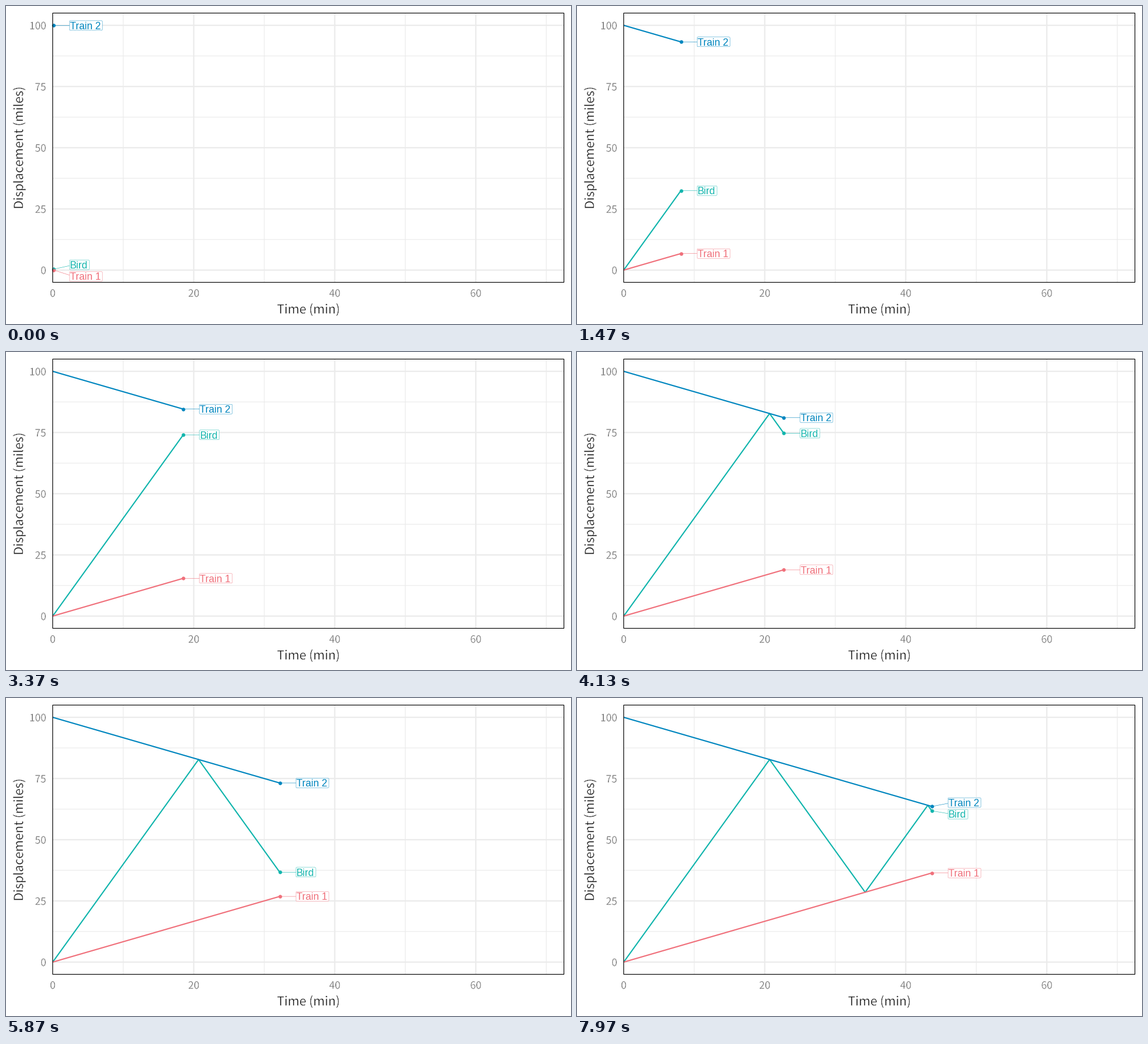
Animation of 998x561 px, one loop 8000 ms. Source, as a matplotlib script:

```python
import matplotlib.pyplot as plt
from matplotlib.animation import FuncAnimation
from matplotlib.patches import FancyBboxPatch, Rectangle
from matplotlib.patheffects import Normal, Stroke

W, H = 998, 561
LOOP, TICK = 8000, 20               # ms
LEFT, RIGHT, TOP, BOTTOM = 82.5, 985.5, 12.5, 487.5

TRAIN, BIRD = 50 / 60, 4.0          # miles per minute
T0, DT = 0.085, 0.18245             # minutes at the start, minutes per step
COLORS = {"Bird": "#12b5ad", "Train 1": "#f0707b", "Train 2": "#0086bf"}
WIDTHS = {"Bird": 35, "Train 1": 58, "Train 2": 58}
NUDGE, BOX_H, PITCH = 28.6, 17, 20.5


def px(t):
    return LEFT + (RIGHT - LEFT) * t / 72.5


def py(d):
    return BOTTOM - (BOTTOM - TOP) * (d + 5) / 110


def turning_points(n):
    """Times and places where the bird meets a train and turns round."""
    t, d, pts = 0.0, 0.0, [(0.0, 0.0)]
    for i in range(n):
        gap = 100 - TRAIN * t - d if i % 2 == 0 else d - TRAIN * t
        step = gap / (BIRD + TRAIN)
        t += step
        d += BIRD * step * (1 if i % 2 == 0 else -1)
        pts.append((t, d))
    return pts


TURNS = turning_points(6)


def bird_path(t):
    done = [p for p in TURNS if p[0] <= t]
    t1, d1 = done[-1]
    way = 1 if len(done) % 2 else -1
    return done + [(t, d1 + way * BIRD * (t - t1))]


def paths(t):
    return {
        "Bird": bird_path(t),
        "Train 1": [(0, 0), (t, TRAIN * t)],
        "Train 2": [(0, 100), (t, 100 - TRAIN * t)],
    }


def label_heights(ys):
    """Push apart the bird's label and a train's label that would overlap."""
    out = dict(ys)
    for train, sign, bias in (("Train 1", 1, 1.8), ("Train 2", -1, -0.4)):
        if abs(ys[train] - ys["Bird"]) < PITCH:
            mid = (ys[train] + ys["Bird"]) / 2 + bias
            out[train] = mid + sign * PITCH / 2
            out["Bird"] = mid - sign * PITCH / 2
    return out


fig = plt.figure(figsize=(W / 72, H / 72), dpi=72, facecolor="white")
ax = fig.add_axes([0, 0, 1, 1])
ax.set_xlim(0, W)
ax.set_ylim(H, 0)
ax.axis("off")


def grid(width, ts, ds):
    style = dict(color="#ebebeb", lw=width, solid_capstyle="butt", zorder=1,
                 snap=False)
    for t in ts:
        ax.plot([px(t)] * 2, [TOP, BOTTOM], **style)
    for d in ds:
        ax.plot([LEFT, RIGHT], [py(d)] * 2, **style)


def thin_text(x, y, s, size, color, **kw):
    thin = [Normal(), Stroke(linewidth=0.65, foreground="white")]
    ax.text(x, y, s, size=size, color=color, family="Noto Sans CJK JP",
            path_effects=thin, **kw)


grid(1.2, range(10, 71, 20), (12.5, 37.5, 62.5, 87.5))
grid(2.3, range(20, 61, 20), range(0, 101, 25))
ax.add_patch(Rectangle((LEFT, TOP), RIGHT - LEFT, BOTTOM - TOP, fill=False,
                       ec="black", lw=1.2, zorder=9, snap=False))

for t in range(0, 61, 20):
    thin_text(px(t), 513, t, 17.9, "#4d4d4d", ha="center", va="baseline")
for d in range(0, 101, 25):
    thin_text(71, py(d) + 7, d, 17.9, "#4d4d4d", ha="right", va="baseline")
thin_text(534, 542.5, "Time (min)", 22, "black", ha="center", va="baseline")
thin_text(35, 250.5, "Displacement (miles)", 22, "black", rotation=90,
          ha="right", va="center")


class Mover:
    def __init__(self, name, order):
        c = COLORS[name]
        self.line, = ax.plot([], [], color=c, lw=2.2, zorder=3 + order / 10,
                             solid_capstyle="butt", solid_joinstyle="round")
        self.dot, = ax.plot([], [], "o", color=c, ms=6.4, mew=0, snap=False,
                            zorder=4 + order / 10)
        self.link, = ax.plot([], [], color=c, lw=0.6, zorder=5, snap=False)
        self.box = FancyBboxPatch((0, 0), WIDTHS[name], BOX_H, fc="white",
                                  ec=c, lw=0.45, zorder=6, snap=False,
                                  boxstyle="round,pad=0,rounding_size=1.6")
        ax.add_patch(self.box)
        self.text = ax.text(0, 0, name, color=c, size=17.8, zorder=7,
                            family="Liberation Sans", va="baseline")

    def place(self, path, label_y):
        xs = [px(t) for t, _ in path]
        ys = [py(d) for _, d in path]
        x, y = xs[-1], ys[-1]
        edge = x + NUDGE
        self.line.set_data(xs, ys)
        self.dot.set_data([x], [y])
        self.link.set_data([x, edge], [y, label_y + 0.2 * (y - label_y)])
        self.box.set_x(edge)
        self.box.set_y(label_y - BOX_H / 2)
        self.text.set_position((edge + 0.6, label_y + 6.4))


movers = {name: Mover(name, i) for i, name in enumerate(COLORS)}


def draw(frame):
    # The plot moves 30 times a second, with starts rounded to 10 ms.
    ms = frame * TICK + 10
    step = (ms + 4) * 3 // 100
    now = paths(T0 + DT * step)
    heights = label_heights({n: py(p[-1][1]) for n, p in now.items()})
    for name, mover in movers.items():
        mover.place(now[name], heights[name])
    return []


anim = FuncAnimation(fig, draw, frames=LOOP // TICK, interval=TICK,
                     init_func=lambda: draw(0), repeat=True, repeat_delay=0)
plt.show()
```
